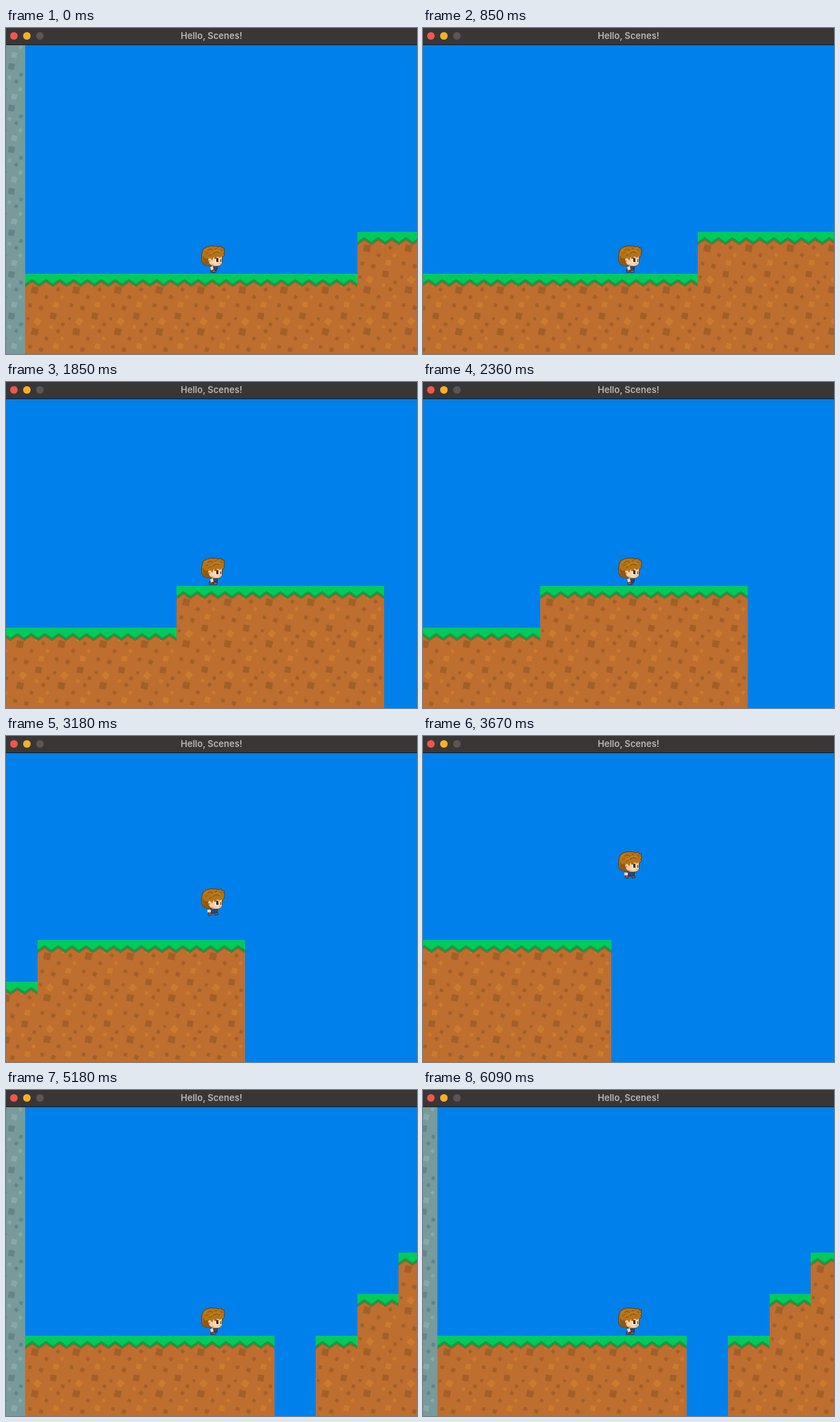
Write an HTML page with a canvas that moves like this. It is 600x475 px and loops after 6120 ms.

```html
<!DOCTYPE html>
<html lang="en">
<head>
<meta charset="utf-8">
<title>Hello, Scenes!</title>
<style>
  html, body { margin: 0; width: 100%; height: 100%; overflow: hidden; background: #0080ea; }
  canvas { position: absolute; left: 0; top: 0; }
  .bar {
    position: absolute; left: 0; top: 0; width: 600px; height: 25px; box-sizing: border-box;
    background: #3b3636; border-bottom: 1px solid #1d1a1b;
    font: 600 13px/22px Inter, Roboto, sans-serif; color: #bab6b6; text-align: center;
  }
  .bar i { position: absolute; top: 6px; width: 11px; height: 11px; border-radius: 50%; }
</style>
</head>
<body>
<canvas width="600" height="475"></canvas>
<div class="bar">
  <i style="left:6px;background:#f1564c"></i>
  <i style="left:25px;background:#f8b026"></i>
  <i style="left:44px;background:#5a5657"></i>
  Hello, Scenes!
</div>
<script>
const ctx = document.querySelector('canvas').getContext('2d');
const LOOP = 6120, TILE = 60.6, LEFT = 28, GROUND = 358;
const SPEED = 0.1524, SWITCH = 4820, RESTART = 6045;
const GRAVITY = 6.84e-4, LEAP = 0.351;

const DIRT = { base: '#be6e2f', dark: '#a26029', light: '#cb7b2d' };
const STONE = { base: '#779a9b', dark: '#628687', light: '#88a9aa' };

// Runs of columns: first column, count, height in tiles
const LEVELS = [
  [[0, 8, 0], [8, 5, 1]],
  [[0, 6, 0], [7, 1, 0], [8, 1, 1], [9, 3, 2]]
];

// Patches in one tile: x, y, size, angle, tone
const PATCHES = [
  [41, 1, 9, 0.15, 'dark'], [14, 24, 10, 0.2, 'dark'],
  [23, 50, 6, 0.4, 'dark'], [55, 13, 5, 0.3, 'dark'],
  [48, 23, 5, 0.75, 'dark'], [7, 46, 5, 0.2, 'dark'],
  [31, 34, 5, 0.6, 'dark'], [4, 5, 4, 0.4, 'dark'],
  [18, 9, 9, 0.7, 'light'], [45, 45, 8, 0.25, 'light'],
  [38, 17, 5, 0.3, 'light'], [54, 34, 5, 0.7, 'light']
];

function rect(color, x, y, w, h) {
  ctx.fillStyle = color;
  ctx.fillRect(x, y, w, h);
}

function shape(color, d, line) {
  const path = new Path2D(d);
  ctx.fillStyle = color;
  ctx.fill(path);
  if (line) {
    ctx.strokeStyle = line;
    ctx.lineWidth = 1;
    ctx.stroke(path);
  }
}

function block(tones, x, top, cols) {
  ctx.save();
  ctx.beginPath();
  ctx.rect(x, top, Math.round(cols * TILE), 475 - top);
  ctx.clip();
  rect(tones.base, x, top, cols * TILE + 1, 475 - top);
  for (let c = 0; c < cols; c++) {
    for (let y = top; y < 480; y += TILE) {
      for (const [px, py, size, angle, tone] of PATCHES) {
        ctx.save();
        ctx.translate(x + c * TILE + px, y + py);
        ctx.rotate(angle);
        rect(tones[tone], -size / 2, -size / 2, size, size);
        ctx.restore();
      }
    }
  }
  ctx.restore();
}

function zigzag(color, x, top, cols, depth) {
  ctx.fillStyle = color;
  ctx.beginPath();
  ctx.moveTo(x, top);
  const teeth = cols * 6, w = Math.round(cols * TILE);
  for (let i = 0; i <= teeth; i++) {
    ctx.lineTo(x + w * i / teeth, top + depth - (i % 2) * 7);
  }
  ctx.lineTo(x + w, top);
  ctx.fill();
}

function drawLevel(runs, scroll) {
  block(STONE, Math.round(LEFT - TILE - scroll), GROUND - 6 * TILE, 1);
  for (const [first, cols, height] of runs) {
    const x = Math.round(LEFT + first * TILE - scroll);
    const top = Math.round(GROUND - height * TILE);
    block(DIRT, x, top, cols);
    zigzag('#9b5b28', x, top, cols, 19.5);
    zigzag('#109d49', x, top, cols, 18);
    zigzag('#00cb5a', x, top, cols, 14.5);
  }
}

function drawHero(y, airborne, stride) {
  ctx.save();
  ctx.translate(285, y);

  // legs and body
  if (airborne) {
    shape('#a9553c', 'M11 33L16 33 15 39 10 39Z', '#4d2b22');
    shape('#a9553c', 'M19 34L23 34 25 38 20 39Z', '#4d2b22');
  } else {
    shape('#94503a', `M${14 - stride} 35h5v4h-5Z`, '#3c2a2a');
    shape('#b1674a', `M${16 + stride} 35h5v4h-5Z`, '#3c2a2a');
  }
  shape('#2c4776', 'M13 28L24 28 23 36 14 36Z', '#26304c');
  shape('#f3d9bd', airborne ? 'M9 31h5v4h-5Z' : 'M13 31L17 30 18 35 14 36Z');

  // head
  shape('#b57318',
    'M1 11L3 5 8 2 14 .5 22 1 26 2 29 .5 30 3 34 4 33 7 35 9 33 11 34 14 31 17 ' +
    '30 26 26 30 12 29 8 29 3 27 1 23 .5 17Z', '#633b10');
  shape('#925711', 'M2 15L6 19 9 18 12 23 13 28 8 28 3 26Z');
  shape('#f7d3ab', 'M10 20L13 18 16 22 18 17 21 19 24 16 27 18 30 16 30 26 27 29 17 30 12 26Z');
  shape('#d99f70', 'M11 21h2v3h-2Z M14 26L20 29 26 29 24 30 17 30Z');
  rect('#fff3e4', 20, 21, 5, 4);
  rect('#3d241b', 22, 19, 3, 5);
  rect('#3d241b', 28, 20, 1, 4);
  rect('#6b3d16', 19, 18, 6, 1);
  rect('#d98d70', 26, 26, 2, 1);

  // hair strands
  ctx.strokeStyle = '#875010';
  ctx.lineWidth = 1;
  ctx.stroke(new Path2D('M9 7L13 5 17 7 M17 12L22 9 27 11 M6 12L10 10 M11 15L15 13 M28 6L31 7 M20 5L23 4'));
  ctx.strokeStyle = '#c98728';
  ctx.stroke(new Path2D('M5 8L10 4 M18 8L23 7 28 9 M13 11L17 9'));
  ctx.restore();
}

const leap = dt => LEAP * dt - GRAVITY * dt * dt / 2;

function heroState(t) {
  if (t >= SWITCH) return { lift: 0, airborne: false };
  if (t >= 3072) return { lift: 61 + leap(t - 3072), airborne: true };
  if (t >= 1810) return { lift: 61, airborne: false };
  if (t >= 1000) return { lift: leap(t - 1000), airborne: true };
  return { lift: 0, airborne: false };
}

function scrollAt(t) {
  if (t >= SWITCH) return Math.max(0, t - RESTART) * SPEED;
  // short hitch near the start, then a steady run
  const run = t < 330 ? Math.min(t, 180) : t - 120;
  return Math.min(542, run * SPEED);
}

function draw(t) {
  const scroll = scrollAt(t);
  const { lift, airborne } = heroState(t);
  const walking = t < SWITCH || t > RESTART;
  const stride = walking ? Math.round(Math.sin(scroll / 8) * 2) : 0;
  rect('#0080ea', 0, 0, 600, 475);
  drawLevel(LEVELS[t < SWITCH ? 0 : 1], scroll);
  drawHero(Math.round(317 - lift), airborne, stride);
}

const start = performance.now();
function tick() {
  draw((performance.now() - start) % LOOP);
  requestAnimationFrame(tick);
}
tick();
</script>
</body>
</html>
```
